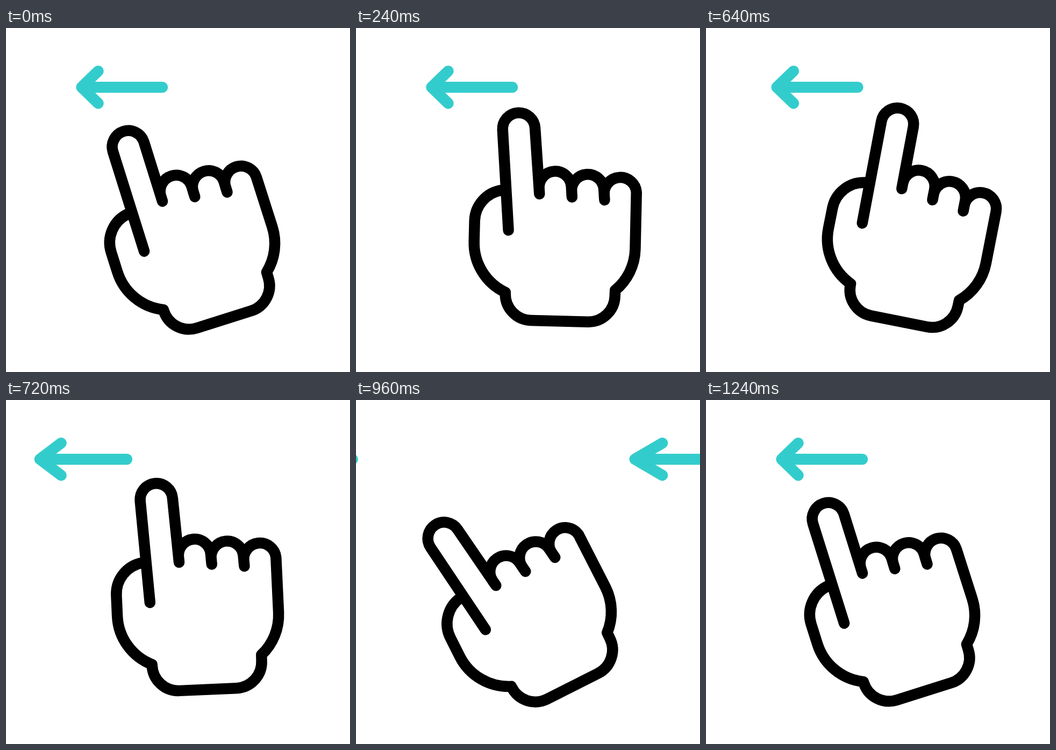
An HTML page with a canvas for the animation above (1480 ms loop, 640 px wide and 640 px high).

```html
<!DOCTYPE html>
<html lang="en">
<head>
<meta charset="utf-8">
<title>Swipe left</title>
<style>
  html, body { margin: 0; height: 100%; overflow: hidden; background: #fff; }
  canvas { display: block; width: 100vmin; height: 100vmin; }
</style>
</head>
<body>
<canvas width="640" height="640"></canvas>
<script>
const ctx = document.querySelector('canvas').getContext('2d');
const LOOP = 1480, STEP = 40, PI = Math.PI;

// Smooth 0..1 ramp; a power below 1 gives a quicker start
function ease(t, start, duration, power = 1) {
  const u = Math.min(1, Math.max(0, (t - start) / duration)) ** power;
  return u * u * (3 - 2 * u);
}

// Rises from 0 to 1 and falls back as e goes from 0 to 1
const hump = e => 4 * e * (1 - e);

// Turns everything built inside counterclockwise around a point
function bent(angle, x, y, build) {
  ctx.save();
  ctx.translate(x, y);
  ctx.rotate(-angle);
  ctx.translate(-x, -y);
  build();
  ctx.restore();
}

function drawHand(t) {
  const raise = ease(t, 40, 360);
  const strike = ease(t, 600, 330, .8);
  const release = ease(t, 930, 310);
  const reach = strike - release;
  const angle = -17.5 + 32.5 * raise - 42 * strike + 9.5 * release;
  const bend = .1 * hump(raise) + .145 * reach, fingerBend = .85 * bend;

  ctx.save();
  ctx.translate(370 + 2.4 * hump(raise) - 16 * reach,
    458 - 4 * hump(raise) - 9 * hump(strike) - 3 * reach);
  ctx.rotate(angle * PI / 180);
  ctx.beginPath();

  // Index finger
  ctx.moveTo(-94.8 + 50 * fingerBend, -74.6 - 12 * fingerBend);
  bent(fingerBend, -18, -125, () => ctx.arc(-64.4, -268.7, 30.2, PI, 2 * PI));

  // Folded fingers
  bent(bend, 53, -147, () => {
    for (let i = 0; i < 3; i++) {
      const left = -34.5 + 60 * i, bottom = -153 + 10 * i;
      ctx.lineTo(left, bottom);
      ctx.moveTo(left, bottom);
      ctx.arc(left + 30.1, bottom - 10, 30.1, PI, 2 * PI);
    }
  });

  // Palm edge, wrist, palm edge, thumb
  ctx.arc(44.3, -46, 101.7, 0, .859);
  ctx.arc(61.5, 42, 49, 0, PI / 2);
  ctx.arc(-44.5, 42, 49, PI / 2, PI);
  ctx.arc(-52.3, -53, 101.7, 1.988, PI);
  ctx.arc(-95, -91.5, 59, PI, 1.45 * PI);

  ctx.strokeStyle = '#000';
  ctx.stroke();
  ctx.restore();
}

// The tip runs ahead of the shaft while moving
function drawArrow(shift, lead) {
  const y = 110.2, tip = 140.5 + shift - lead, wing = 171.5 + shift - lead / 4;
  ctx.beginPath();
  ctx.moveTo(wing, y - 30);
  ctx.lineTo(tip, y);
  ctx.lineTo(wing, y + 30);
  ctx.moveTo(tip, y);
  ctx.lineTo(291 + shift, y);
  ctx.strokeStyle = '#3cc';
  ctx.stroke();
}

function draw(now) {
  const t = Math.floor(now % LOOP / STEP) * STEP;
  ctx.clearRect(0, 0, 640, 640);
  ctx.lineWidth = 20.5;
  ctx.lineCap = ctx.lineJoin = 'round';

  const leave = ease(t, 600, 400), enter = ease(t, 840, 400);
  if (leave < 1) drawArrow(-306 * leave, 25 * hump(leave) ** 2);
  if (enter > 0) drawArrow(517 * (1 - enter), 40 * hump(enter));
  drawHand(t);
}

const start = performance.now();
function tick() {
  draw(performance.now() - start);
  requestAnimationFrame(tick);
}
tick();
</script>
</body>
</html>
```
